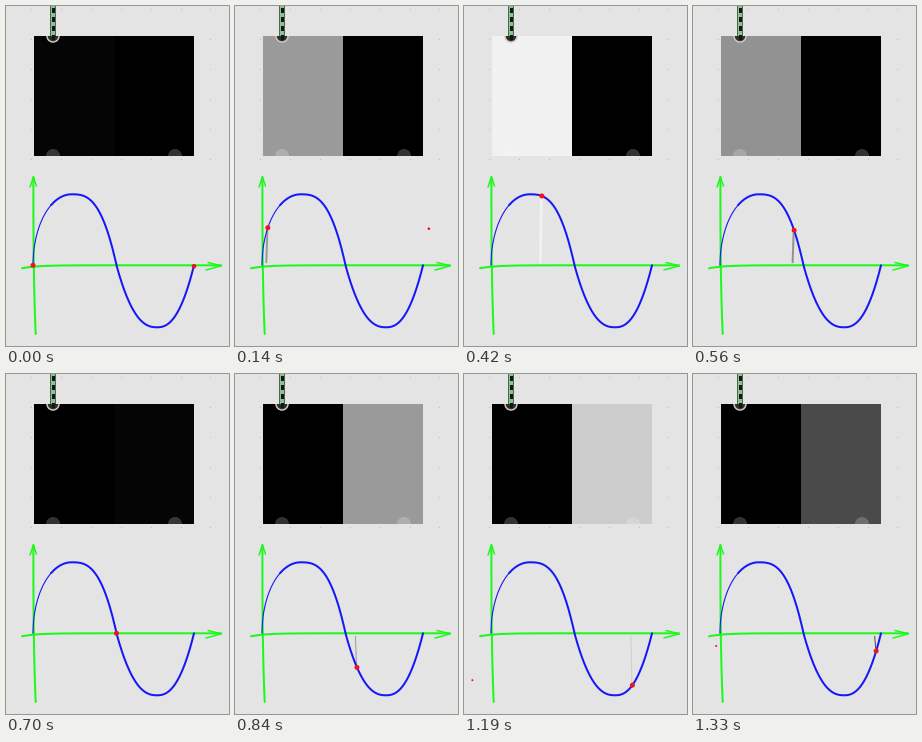
Animation of 223 by 340 pixels, one loop 1400 ms. Source, as a matplotlib script:

```python
import numpy as np
import matplotlib.pyplot as plt
from matplotlib.animation import FuncAnimation
from matplotlib.patches import Circle, Rectangle

W, H, DPI = 223, 340, 100
FRAMES, STEP = 20, 70
PX = 72 / DPI
GREEN, BLUE, RED = "#1cf81c", "#1616fa", "#f01418"

# Key places of the sketched wave
START, PEAK, CROSS, TROUGH, END = 27, 65.5, 110.5, 151, 188
AXIS_Y, RISE, DEPTH = 259.3, 71, 62

fig = plt.figure(figsize=(W / DPI, H / DPI), dpi=DPI, facecolor="#e4e4e4")
ax = fig.add_axes([0, 0, 1, 1])
ax.set_xlim(0, W)
ax.set_ylim(H, 0)
ax.axis("off")


def stroke(x, y, color, width, z):
    return ax.plot(x, y, color=color, lw=width * PX, zorder=z,
                   solid_capstyle="round", solid_joinstyle="round")[0]


def disc(x, y, r, color, z, **kw):
    return ax.add_patch(Circle((x, y), r, fc=color, zorder=z, **kw))


def rect(x, y, w, h, color, z):
    return ax.add_patch(Rectangle((x, y), w, h, fc=color, lw=0, zorder=z))


def wave(x):
    """Hand-drawn sine: round start, then two lopsided lobes."""
    x = np.asarray(x, float)
    rise = np.sqrt(np.clip(1 - ((PEAK - x) / (PEAK - START))**2, 0, 1))
    fall = 1 - np.clip((x - PEAK) / (CROSS - PEAK), 0, 1)**2.9
    half = np.where(x < TROUGH, TROUGH - CROSS, END - TROUGH)
    dip = 1 - np.abs((x - TROUGH) / half)**2.4
    hump = AXIS_Y - RISE * np.where(x < PEAK, rise, fall)
    return np.where(x < CROSS, hump, AXIS_Y + DEPTH * dip)


def ease(t):
    return (1 - np.cos(np.pi * t)) / 2


def dot_x(t):
    """Position over the loop, t from 0 to 1."""
    if t < 0.5:
        return START + (CROSS - START) * ease((2 * t)**1.1)
    s = 2 * t - 1
    return CROSS + (END - CROSS) * (s + ease(s)) / 2


# Faint grid
for col in range(7):
    for row in range(6):
        rect(25 + 29.9 * col, 3 + 30 * row, 1, 1, "#bcbcbc", 0)

# Panels with half-hidden sockets
panels = [rect(x, 30, 80, 120, "k", 1) for x in (28, 108)]
box = Rectangle((28, 30), 160, 120, transform=ax.transData)
for x in (47, 169):
    disc(x, 150, 7, "w", 2, alpha=0.2, lw=0).set_clip_path(box)
disc(47, 30, 6, "#2c302c", 3, ec="#d0c8c4", lw=1.5 * PX).set_clip_path(box)

# Rod
rect(44, -1, 6, 31, "#48684f", 4)
rect(45, -1, 4, 31, "#8cc096", 4)
for y in range(2, 30, 9):
    rect(45.5, y, 3, 5, "#101810", 5)

# Axes
x = np.linspace(16, 215, 60)
stroke(x, AXIS_Y + 3 * np.exp((16 - x) / 15), GREEN, 2, 6)
y = np.linspace(171, 328, 60)
stroke(27.4 + 2.3 * ((y - 171) / 157)**3, y, GREEN, 2, 6)
stroke([202, 215.5, 200], [256.5, 259.8, 264], GREEN, 1.5, 6)
stroke([24, 27.4, 30.5], [181, 171, 180], GREEN, 1.5, 6)

# Wave, thinner where it starts
x = START + (END - START) * np.linspace(0, 1, 300)**2
thin = x < 45
stroke(x[thin], wave(x[thin]), BLUE, 1.1, 7)
stroke(x[~thin], wave(x[~thin]), BLUE, 2, 7)

bar = stroke([0, 0], [0, 0], "k", 1, 5)
dot = disc(START, AXIS_Y, 2.5, RED, 9, lw=0)
ghost = disc(END, AXIS_Y, 1, RED, 9, lw=0)


def draw(i):
    t = i / FRAMES
    level = np.sin(2 * np.pi * t + 0.018)
    for panel, s in zip(panels, (level, -level)):
        panel.set_facecolor([max(s, 0)] * 3)

    x = dot_x(t)
    y = float(wave(x))
    dot.center = (x, y)

    # Small copy of the dot, one period away
    ghost.center = (x + 161, y + 1) if t < 0.5 else (x - 160, y - 5)
    ghost.set_radius(max(1, 2.3 - i * 0.5))

    s = abs(level)
    side = np.sign(y - AXIS_Y)
    bar.set_data([x - 1.5, x - 0.5], [AXIS_Y + 3 * side, y - 3 * side])
    bar.set_color([s] * 3)
    bar.set_linewidth((2.8 if s > 0.9 else 2 if level > 0 else 1) * PX)
    bar.set_visible(bool(abs(y - AXIS_Y) > 7))
    return [*panels, dot, ghost, bar]


anim = FuncAnimation(fig, draw, frames=FRAMES, interval=STEP,
                     repeat=True, repeat_delay=0, blit=False)
plt.show()
```
